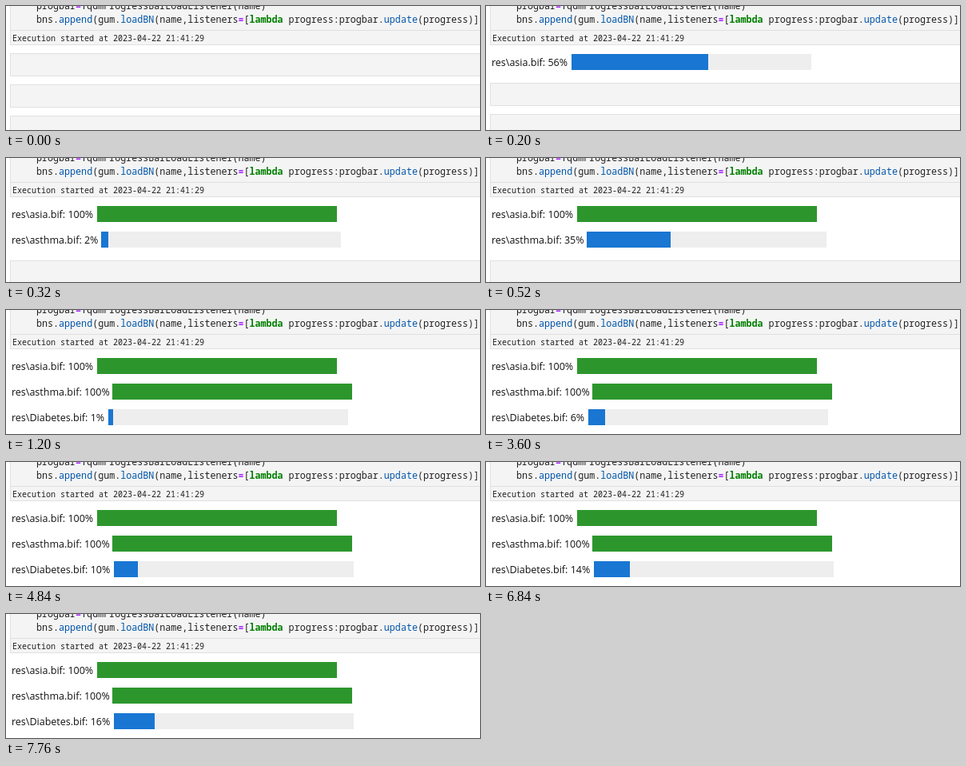
Recreate the animation shown at these times as an HTML page. Size 593x155 px, loop 8000 ms.

```html
<!DOCTYPE html>
<html lang="en">
<head>
<meta charset="utf-8">
<title>Loading progress</title>
<style>
  html, body { margin: 0; width: 100%; height: 100%; overflow: hidden; background: #fff; }
  svg { display: block; width: 593px; height: 155px; }
  text { white-space: pre; fill: #212121; }
  rect { shape-rendering: crispEdges; }
  .code { font: 11.7px "Noto Sans Mono", monospace; }
  .stamp { font: 10px "Noto Sans Mono", monospace; }
  .label { font: 12.5px "Open Sans", sans-serif; fill: #111; }
  .prop { fill: #05a; }
  .op { fill: #a2f; font-weight: bold; }
  .key { fill: #008000; font-weight: bold; }
  .cell { fill: #f4f4f4; stroke: #e0e0e0; }
  .track { fill: #eee; }
</style>
</head>
<body>
<svg viewBox="0 0 593 155">
  <rect class="cell" x="5.5" y="-5.5" width="600" height="54"/>
  <rect x="5" y="30" width="588" height="1" fill="#e0e0e0"/>
  <text class="code" x="38" y="4">progbar<tspan class="op">=</tspan>TqdmProgressBarLoadListener(name)</text>
  <text class="code" x="38" y="21">bns.<tspan class="prop">append</tspan>(gum.<tspan class="prop">loadBN</tspan>(name,listeners<tspan class="op">=</tspan>[<tspan class="key">lambda</tspan> progress:progbar.<tspan class="prop">update</tspan>(progress)])</text>
  <text class="stamp" x="8" y="44">Execution started at 2023-04-22 21:41:29</text>
  <g id="cells"></g>
  <g id="rows"></g>
</svg>
<script>
const LOOP = 8000, DIGIT = 7, ROW = 32, BLUE = '#1976d2', GREEN = '#2c962c';

// x: bar start with a one-digit percentage; keys: [ms, percent], linear in between
const files = [
  { name: 'asia', x: 100, keys: [[80, 12], [240, 100]] },
  { name: 'asthma', x: 119, keys: [[320, 2], [800, 100]] },
  { name: 'Diabetes', x: 128, keys: [
    [800, 0.6], [1200, 1], [1800, 2], [2520, 4], [4520, 8], [4840, 9.5], [5760, 12], [8000, 16.49]] }
];

const rows = document.getElementById('rows');
const cells = document.getElementById('cells');

function add(parent, tag, attrs) {
  const el = document.createElementNS('http://www.w3.org/2000/svg', tag);
  for (const key in attrs) el.setAttribute(key, attrs[key]);
  return parent.appendChild(el);
}

for (let i = 0; i < 3; i++) {
  add(cells, 'rect', { class: 'cell', x: 5.5, y: 59.5 + 39 * i, width: 600, height: 28 });
}

files.forEach((file, i) => {
  const y = 60 + ROW * i;
  file.row = add(rows, 'g', {});
  file.label = add(file.row, 'text', { class: 'label', x: 7, y: y + 15 });
  file.track = add(file.row, 'rect', { class: 'track', y, width: 300, height: 20 });
  file.bar = add(file.row, 'rect', { y, height: 20 });
});

function percentAt(keys, t) {
  const next = keys.findIndex(([ms]) => ms > t);
  if (next < 0) return keys[keys.length - 1][1];
  const [t0, v0] = keys[next - 1], [t1, v1] = keys[next];
  return v0 + (v1 - v0) * (t - t0) / (t1 - t0);
}

function show(file, t) {
  const started = t >= file.keys[0][0];
  file.row.style.display = started ? '' : 'none';
  if (!started) return false;
  const value = percentAt(file.keys, t), shown = String(Math.round(value));
  const x = file.x + DIGIT * (shown.length - 1);
  file.label.textContent = `res\\${file.name}.bif: ${shown}%`;
  file.track.setAttribute('x', x);
  file.bar.setAttribute('x', x);
  file.bar.setAttribute('width', 3 * Math.min(100, Math.floor(value) + 1));
  file.bar.setAttribute('fill', value < 100 ? BLUE : GREEN);
  return true;
}

function draw(now) {
  const t = now % LOOP;
  const step = t < 800 ? 80 : 40;
  const held = Math.floor(t / step) * step;
  const count = files.filter(file => show(file, held)).length;
  cells.setAttribute('transform', `translate(0 ${count ? 5 + ROW * count : 0})`);
}

const start = performance.now();
function tick() {
  draw(performance.now() - start);
  requestAnimationFrame(tick);
}
tick();
</script>
</body>
</html>
```
